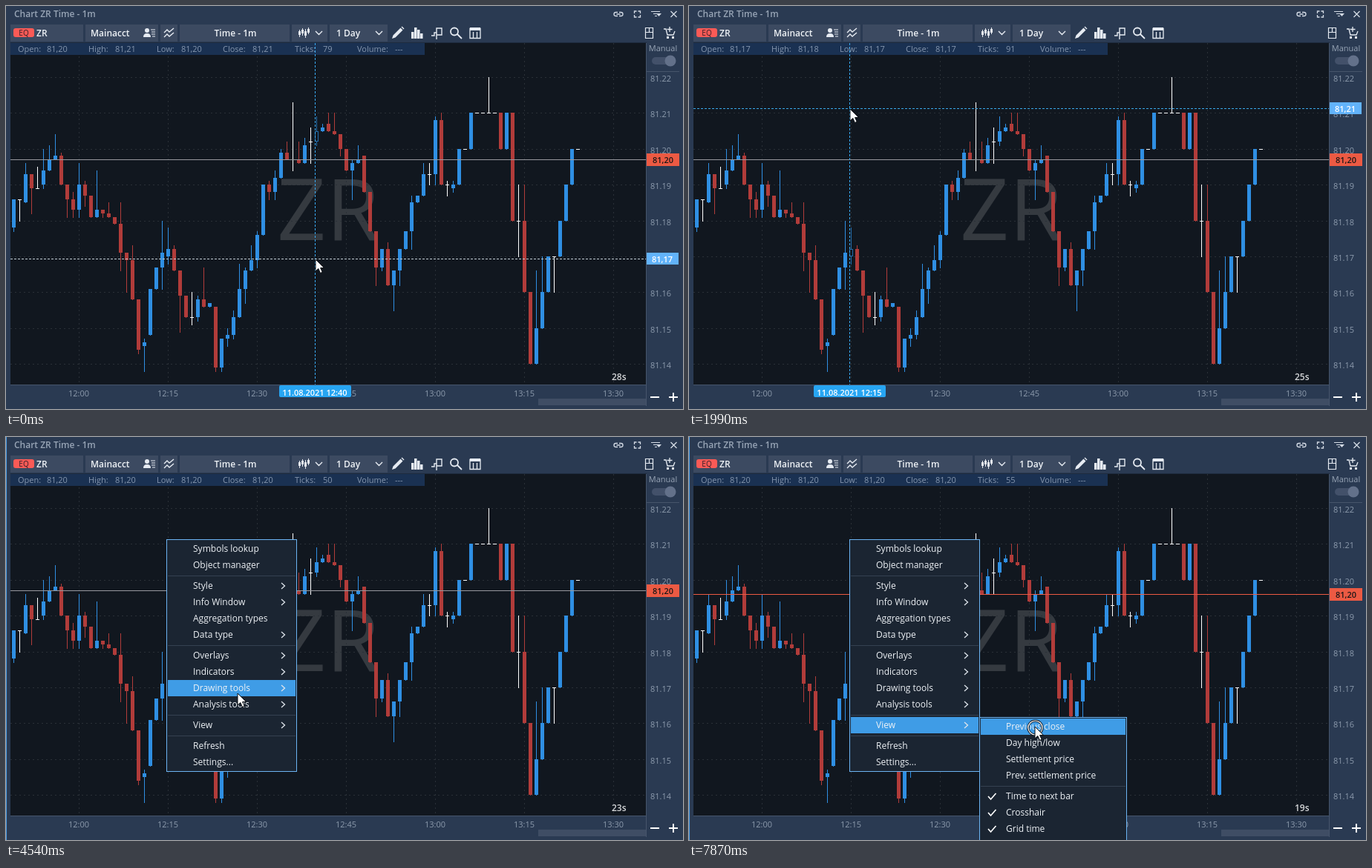
Animation, 912 px wide and 544 px high, one loop 8000 ms. Source, as an HTML page with a canvas:

```html
<!DOCTYPE html>
<html lang="en">
<head>
<meta charset="utf-8">
<title>Chart</title>
<style>
html, body { margin: 0; width: 100%; height: 100%; overflow: hidden; background: #2a3a52; }
canvas { display: block; }
</style>
</head>
<body>
<canvas id="stage" width="912" height="544"></canvas>
<script>
const ctx = document.getElementById('stage').getContext('2d');
const LOOP = 8000, TICKER = 'ZR';
const BLUE = '#2f8fe3', RED = '#b13c3a', PLOT = '#11171f', HOVER = '#3f9ce6', ACCENT = '#62b3fb';

// Prices count thousandths below 81.22; a candle opens at the last close unless listed.
const closes = [
  34, 34, 27, 31, 31, 26, 23, 22, 30, 34, 37, 30, 33, 39, 37, 38, 39, 41, 49, 51,
  62, 76, 74, 59, 53, 49, 48, 54, 61, 67, 67, 62, 64, 63, 81, 73, 72, 67, 59, 54,
  51, 44, 30, 32, 28, 21, 23, 23, 24, 19, 18, 15, 14, 15, 16, 20, 26, 24, 23, 32,
  43, 53, 48, 58, 54, 48, 43, 35, 33, 27, 27, 12, 30, 30, 30, 20, 20, 10, 10, 10,
  10, 10, 20, 10, 40, 40, 60, 80, 70, 60, 50, 50, 40, 30, 20, 20];
const opens = { 0: 42, 2: 35, 5: 30, 22: 75, 23: 72, 26: 50, 34: 64, 50: 18, 53: 13, 59: 22, 74: 31 };
const highs = {
  2: 24, 4: 25, 5: 20, 6: 19, 7: 16, 8: 21, 10: 32, 11: 24, 12: 29, 14: 26, 16: 35, 18: 35,
  20: 47, 22: 73, 25: 40, 26: 42, 27: 47, 30: 60, 31: 61, 32: 53, 36: 70, 37: 65, 38: 52, 39: 53,
  40: 47, 41: 43, 43: 29, 44: 26, 45: 20, 46: 18, 47: 7, 48: 18, 49: 17, 50: 14, 51: 11, 52: 13,
  53: 10, 54: 10, 57: 23, 58: 19, 63: 46, 67: 33, 69: 24, 70: 24, 71: 11, 72: 10, 73: 29, 74: 29,
  80: 0, 85: 30, 86: 30, 88: 54, 89: 50 };
const lows = {
  0: 43, 1: 40, 3: 38, 5: 31, 9: 39, 10: 39, 11: 39, 12: 36, 15: 39, 18: 54, 19: 60, 21: 77,
  22: 82, 25: 59, 26: 52, 28: 71, 30: 69, 31: 68, 34: 82, 35: 82, 36: 75, 37: 73, 39: 63, 41: 53,
  43: 34, 44: 34, 47: 26, 50: 24, 51: 19, 55: 22, 57: 34, 61: 58, 62: 54, 64: 65, 65: 58, 67: 48,
  70: 30, 71: 30, 73: 33, 74: 32, 85: 50, 91: 60 };
const candles = closes.map((close, i) => {
  const open = opens[i] ?? closes[i - 1];
  return { open, close, high: highs[i] ?? Math.min(open, close), low: lows[i] ?? Math.max(open, close) };
});
const yOf = k => Math.round(96 + 4.84 * k);
const price = k => (81.22 - k / 1000 + 1e-6).toFixed(2).replace('.', ',');

// Pointer track: time, x, y
const track = [
  [0, 417, 342], [1150, 417, 342], [1450, 314, 267], [1990, 217, 139], [3570, 217, 139], [4120, 296, 257],
  [4360, 311, 318], [4930, 313, 380], [6470, 313, 380], [7230, 462, 388], [7630, 466, 391], [8000, 466, 391]];
const secondTicks = [120, 950, 1960, 3140, 4090, 5340, 6140, 7130, 7600];

const menu = {
  x: 216, y: 138, w: 175, h: 313, rows: [
    [151, 'Symbols lookup'], [173, 'Object manager'], [201, 'Style', '>'], [223, 'Info Window', '>'],
    [245, 'Aggregation types'], [267, 'Data type', '>'], [295, 'Overlays', '>'], [317, 'Indicators', '>'],
    [339, 'Drawing tools', '>'], [361, 'Analysis tools', '>'], [389, 'View', '>'], [417, 'Refresh'], [439, 'Settings...']],
  rules: [187, 281, 375, 403] };
const submenu = {
  x: 391, y: 378, w: 198, h: 190, rows: [
    [391, 'Previous close'], [413, 'Day high/low'], [435, 'Settlement price'], [457, 'Prev. settlement price'],
    [485, 'Time to next bar', '+'], [507, 'Crosshair', '+'], [529, 'Grid time', '+']],
  rules: [471] };

const clamp = v => Math.max(0, Math.min(1, v));

function rect(x, y, w, h, color) {
  ctx.fillStyle = color;
  ctx.fillRect(x, y, w, h);
}
function text(s, x, y, color, size = 12, weight = 400, align = 'left') {
  ctx.font = `${weight} ${size}px "Open Sans", "Noto Sans", sans-serif`;
  ctx.textAlign = align;
  ctx.textBaseline = 'alphabetic';
  ctx.fillStyle = color;
  ctx.fillText(s, x, y + Math.round(size * 0.36));
}
function stroke(d, color = '#e6ebf2', width = 1.4) {
  ctx.strokeStyle = color;
  ctx.lineWidth = width;
  ctx.stroke(new Path2D(d));
}
function shape(d, color = '#e6ebf2') {
  ctx.fillStyle = color;
  ctx.fill(new Path2D(d));
}
function dashed(x1, y1, x2, y2, color, dash) {
  ctx.setLineDash(dash);
  stroke(`M${x1} ${y1}L${x2} ${y2}`, color, 1);
  ctx.setLineDash([]);
}

// Monotone cubic through the track, at rest wherever the pointer pauses
function pointer(time) {
  const t = Math.max(0, time);
  const i = Math.max(0, track.findIndex((p, n) => n && t <= p[0]) - 1);
  const slope = (n, c) => track[n + 1] && track[n]
    ? (track[n + 1][c] - track[n][c]) / (track[n + 1][0] - track[n][0]) : 0;
  const tangent = (n, c) => {
    const a = slope(n - 1, c), b = slope(n, c);
    return a * b > 0 ? 2 * a * b / (a + b) : 0;
  };
  const span = track[i + 1][0] - track[i][0], u = (t - track[i][0]) / span;
  return [1, 2].map(c => {
    const a = track[i][c], b = track[i + 1][c];
    return a + (b - a) * u * u * (3 - 2 * u)
      + span * u * (1 - u) * (tangent(i, c) * (1 - u) - tangent(i + 1, c) * u);
  });
}

function drawToolbar() {
  text(`Chart ${TICKER} Time - 1m`, 11, 11, '#98a5b6', 12, 600);
  for (const [x, w] of [[6, 98], [107, 98], [208, 23], [234, 148], [385, 48], [436, 78]])
    rect(x, 25, w, 23, '#3c4a61');
  ctx.fillStyle = '#fb5a56';
  ctx.beginPath();
  ctx.roundRect(10, 30, 28, 12, 3);
  ctx.fill();
  text('EQ', 24, 36, '#30202a', 10, 400, 'center');
  text(TICKER, 41, 37, '#eef2f6', 12, 600);
  text('Mainacct', 114, 37, '#eef2f6', 12, 600);
  text('Time - 1m', 309, 37, '#eef2f6', 12, 600, 'center');
  text('1 Day', 445, 37, '#eef2f6', 12, 600);
  stroke('M417 34l4.5 4.500 4.500-4.500M498 34l4.500 4.500 4.500-4.500');
  // account and zigzag
  shape('M190 30a3 3 0 1 1 0 6a3 3 0 0 1 0-6M185 42q0-5 5-5t5 5z');
  stroke('M195 32h6M196 35h5M196 38h5M197 41h4', '#e6ebf2', 1);
  stroke('M213 36l4-4 3 3 6-5M213 42l4-4 3 3 6-5');
  // chart style, pencil, columns
  stroke('M395.500 32v10M399.500 30v10M403.500 31v12M407.500 29v9', '#e6ebf2', 1);
  shape('M394 34h3v5h-3zM398 32h3v5h-3zM402 34h3v6h-3zM406 31h3v5h-3z');
  shape('M520 44l1.500-4.500 10-10 3 3-10 10zM532.500 28.500l1-1 3 3-1 1z');
  shape('M546 35h3.500v9h-3.500zM550 29h3.500v15h-3.500zM554 32h3.500v12h-3.500zM558 37h3.500v7h-3.500z');
  // indicator, magnifier, table
  stroke('M573 40h4v-4h3M580 30h7v9h-7zM580 30v15');
  stroke('M609 34.500a5 5 0 1 1-10 0a5 5 0 0 1 10 0M608 38l6 6', '#e6ebf2', 1.800);
  stroke('M625 30.500h14v13h-14zM629.500 35v8M634.500 35v8', '#e6ebf2', 1.300);
  rect(625, 29, 14, 4, '#e6ebf2');
  // mouse and cart
  stroke('M861.500 29.500h10v14h-10zM861.500 35.500h10M866.500 29.500v6', '#e6ebf2', 1.200);
  stroke('M886 31h3l2 8h8l2-5M894 28v7M890.500 31.500h7', '#e6ebf2', 1.300);
  shape('M890 41h3v3h-3zM897 41h3v3h-3z');
  // window controls
  stroke('M824 8.500h-2.500a2.500 2.500 0 0 0 0 5h2.500M826 8.500h2.500a2.500 2.500 0 0 1 0 5h-2.500M822.500 11h5', '#d5dce6', 1.300);
  stroke('M846.500 10v-3h3M851.500 7h3v3M854.500 12v3h-3M849.500 15h-3v-3', '#d5dce6', 1.300);
  stroke('M869 7.500h12M872 10.500h5M874 13.500h3', '#d5dce6', 1.200);
  shape('M876 10h7l-3.500 4z', '#d5dce6');
  stroke('M895.500 7l8 8M903.500 7l-8 8', '#d5dce6', 1.300);
}

function drawCandle({ open, close, high, low }, i, hovered) {
  const x = 10 + 8 * i, top = yOf(Math.min(open, close)), height = Math.abs(yOf(open) - yOf(close));
  const color = open === close ? '#fff' : close < open ? BLUE : RED;
  rect(x, yOf(high), 1, yOf(low) - yOf(high) + 1, hovered ? '#236ba9' : color);
  if (hovered && height) {
    rect(x - 2, top, 5, height, '#236ba9');
    rect(x - 1, top + 1, 3, height - 2, PLOT);
  } else rect(x - 2, top, 5, Math.max(1, height), color);
}

function drawChart(t, cross, hovered) {
  rect(6, 50, 856, 461, PLOT);
  text(TICKER, 434, 274, '#353a40', 116, 400, 'center');
  for (let n = 0; n < 9; n++) {
    dashed(6, yOf(n * 10) + .5, 862, yOf(n * 10) + .5, '#2a3037', [2, 4]);
    text('81.' + (22 - n), 868, 98 + 48.4 * n, '#8d9bad', 11);
  }
  for (let n = 0; n < 7; n++) {
    const x = 98 + 120 * n;
    dashed(x + .5, 50, x + .5, 511, '#2a3037', [2, 4]);
    text(`${12 + (n >> 2)}:${String(n % 4 * 15).padStart(2, '0')}`, x, 523, '#8d9bad', 11, 400, 'center');
  }
  rect(862, 50, 1, 490, '#46556b');
  rect(6, 511, 857, 1, '#46556b');
  rect(6, 49, 857, 1, '#1e2b3e');
  candles.forEach((c, i) => drawCandle(c, i, i === hovered));

  const ticked = t >= 7430, lastY = ticked ? 212 : 207;
  rect(6, lastY, 856, 1, ticked ? '#ec5a43' : '#98999f');
  rect(863, lastY - 8, 44, 17, '#ec5a43');
  text('81,20', 885, lastY + 1, '#1c1718', 11, 600, 'center');

  rect(6, 50, 558, 16, '#1a3152');
  const c = candles[hovered ?? 95];
  const ticks = hovered != null ? Math.floor(79 + (51 - hovered) * .48)
    : t < 3570 ? 49 : t < 6900 ? 50 : ticked ? 55 : 52;
  const fields = [['Open:', 16, price(c.open), 55], ['High:', 111, price(c.high), 147], ['Low:', 203, price(c.low), 236],
    ['Close:', 292, price(c.close), 332], ['Ticks:', 389, ticks, 427], ['Volume:', 473, '---', 524]];
  for (const [name, x, value, valueX] of fields) {
    text(name, x, 58, '#8596ae', 11);
    text(value, valueX, 58, '#8596ae', 11);
  }
  text(28 - secondTicks.filter(s => t >= s).length + 's', 816, 501, '#d6d8da', 12, 600);

  if (cross) {
    const [x, y] = cross.map(Math.round);
    const tint = v => v % 2 ? '#c3ced6' : '#39a9f0';
    dashed(x + .5, 50, x + .5, 511, tint(x), [3, 2]);
    dashed(6, y + .5, 862, y + .5, tint(y), [3, 2]);
    rect(863, y - 8, 43, 16, ACCENT);
    text(price((y - 96) / 4.84), 884, y + 1, '#fff', 11, 600, 'center');
    ctx.fillStyle = '#27a5f2';
    ctx.beginPath();
    ctx.roundRect(x - 48, 512, 97, 16, 2);
    ctx.fill();
    const minute = 720 + hovered - 11;
    text(`11.08.2021 ${Math.floor(minute / 60)}:${String(minute % 60).padStart(2, '0')}`, x, 522, '#fff', 11, 600, 'center');
  }
}

function drawAxisControls() {
  text('Manual', 885, 57, '#98a5b6', 11, 400, 'center');
  ctx.fillStyle = '#43516a';
  ctx.beginPath();
  ctx.roundRect(870, 69, 32, 10, 5);
  ctx.fill();
  ctx.fillStyle = '#63718a';
  ctx.beginPath();
  ctx.arc(895, 74, 7.5, 0, 7);
  ctx.fill();
  rect(863, 88, 44, 1, '#46556b');
  rect(717, 530, 145, 9, '#3f4d64');
  rect(868, 527, 12, 2, '#fff');
  rect(893, 527, 12, 2, '#fff');
  rect(898, 522, 2, 12, '#fff');
}

function drawMenu({ x, y, w, h, rows, rules }, active) {
  rect(x, y, w + 1, h + 1, '#6cb4f3');
  rect(x + 1, y + 1, w - 1, h - 1, '#1b2532');
  for (const rule of rules) rect(x + 2, rule, w - 3, 1, '#354151');
  for (const [rowY, label, mark] of rows) {
    if (label === active) rect(x + 2, rowY - 11, w - 3, 22, HOVER);
    text(label, x + 36, rowY, '#eef2f6', 12);
    if (mark === '>') stroke(`M${x + 155} ${rowY - 4}l4.500 4-4.500 4`, '#dfe5ec', 1.3);
    if (mark === '+') stroke(`M${x + 12} ${rowY}l3.500 4 7-8`, '#fff', 1.6);
  }
}

const rowAt = (rows, y) => rows.find(r => Math.abs(r[0] - y) <= 11)?.[1];

function draw(t) {
  rect(0, 0, 912, 544, '#2a3a52');
  drawToolbar();
  const [mx, my] = pointer(t);
  let cross = null, hovered = null;
  if (t < 2330) {
    cross = pointer(t - 16).map(v => v - 1);
    hovered = Math.round((cross[0] - 10) / 8);
  }
  drawChart(t, cross, hovered);
  drawAxisControls();

  if (t >= 2330) {
    rect(0, 0, 1, 544, '#4a9be4');
    const [hx, hy] = pointer(t - 60);
    const subOpen = t >= 5340, inSub = subOpen && hx > 391;
    const active = inSub ? 'View' : hx > 217.5 ? rowAt(menu.rows, hy) : null;
    ctx.globalAlpha = clamp((t - 2300) / 160);
    drawMenu(menu, active);
    ctx.globalAlpha = 1;
    if (subOpen) drawMenu(submenu, inSub ? rowAt(submenu.rows, hy) : null);
  }
  if (t >= 7870 || (t >= 2290 && t < 2420)) {
    const ring = `M${mx + 10} ${my + 1.5}a9.500 9.500 0 1 1-19 0a9.500 9.500 0 0 1 19 0`;
    stroke(ring, '#10161e', 3);
    stroke(ring, '#fff', 1.2);
  }
  ctx.save();
  ctx.translate(Math.round(mx), Math.round(my));
  const arrow = 'M0 0v16l3.800-3.500 2.700 6 2.700-1.200-2.600-5.800h5z';
  shape(arrow, '#fff');
  stroke(arrow, '#0b0f14', 1);
  ctx.restore();
}

function frame() {
  draw(performance.now() % LOOP);
  requestAnimationFrame(frame);
}
frame();
</script>
</body>
</html>
```
